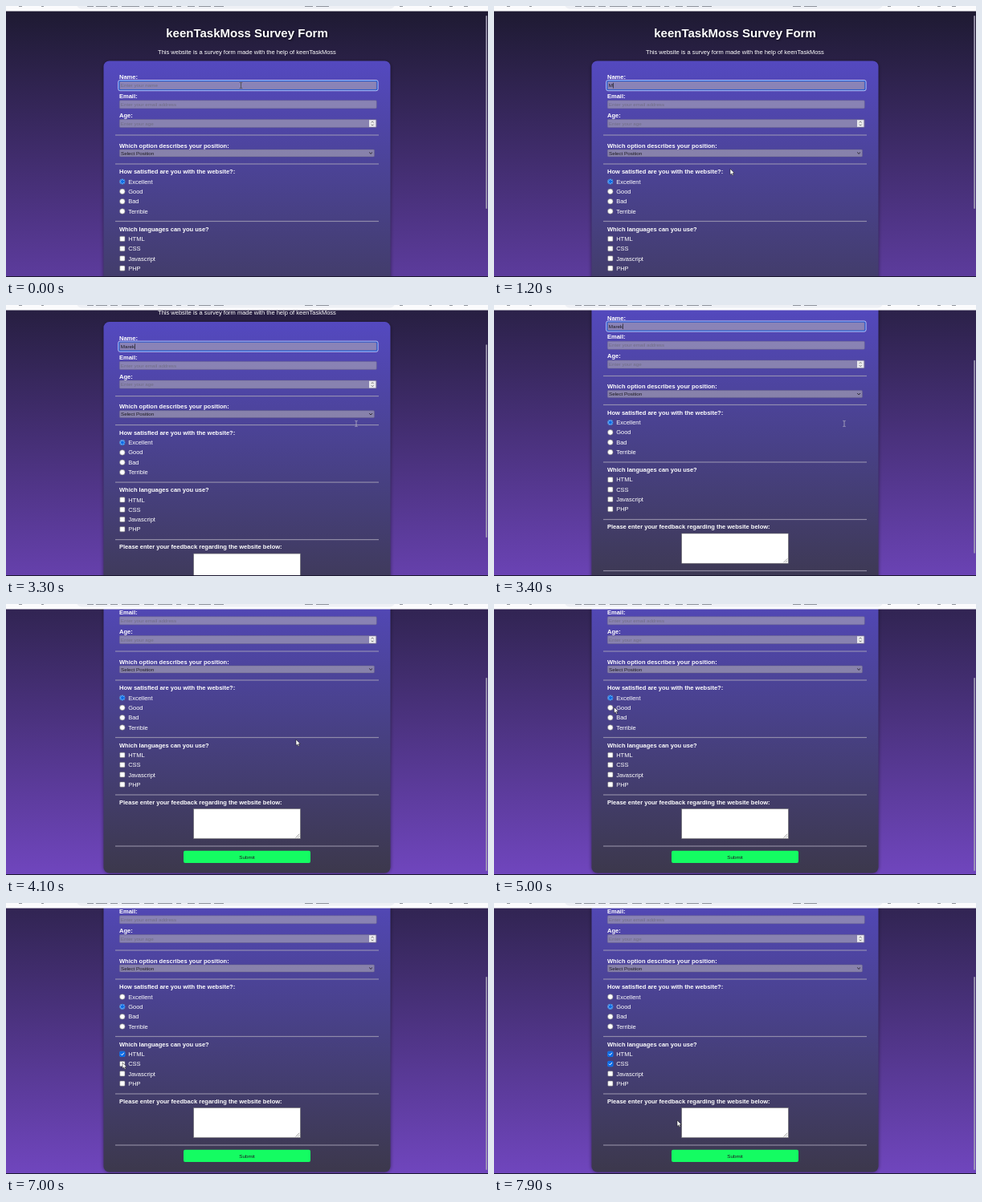
Write an HTML page that moves like this. It is 600x338 px and loops after 8 s.

```html
<!DOCTYPE html>
<html lang="en">
<head>
<meta charset="utf-8">
<title>Survey form</title>
<style>
  html, body { margin: 0; width: 100%; height: 100%; overflow: hidden; background: #1e1a32; }
  svg { display: block; width: 600px; height: 338px; }
  text { font: 7.5px "Liberation Sans", Arial, sans-serif; fill: #fff; }
  .b { font-weight: bold; }
  .title { font-size: 15px; font-weight: bold; text-anchor: middle; filter: drop-shadow(1.5px 1.5px 1px #0009); }
  .mid { text-anchor: middle; }
  .small { font-size: 6.24px; fill: #1c1a22; }
  .hint { fill: #716e86; }
  .field { fill: #b9b4b98c; stroke: #6a668299; stroke-width: .7; }
  .box { fill: #fff; stroke: #777; stroke-width: .6; }
  .on { fill: #0b6ae6; stroke: #0b6ae6; }
</style>
</head>
<body>
<svg viewBox="0 0 600 338">
  <defs>
    <linearGradient id="sky" x2="0" y2="1">
      <stop stop-color="#1e1a32"/><stop offset="1" stop-color="#7046be"/>
    </linearGradient>
    <linearGradient id="card" x2="0" y2="1">
      <stop stop-color="#5449c0"/><stop offset="1" stop-color="#3c384c"/>
    </linearGradient>
    <filter id="soft" x="-10%" y="-10%" width="120%" height="120%"><feGaussianBlur stdDeviation="2"/></filter>
  </defs>
  <g id="page"></g>
  <rect id="thumb" x="597.3" width="1.6" height="241" rx=".8" fill="#a7a3b8"/>
  <rect y="337" width="600" height="1" fill="#1b1730"/>
  <g id="chrome">
    <rect width="600" height="6.5" fill="#fbfbfd"/>
    <rect x="88" y="-10" width="396" height="13.5" rx="6" fill="#eef0f5"/>
    <path d="M16 .4h4M44 .4h3M101 .4h8m3 0h14m4 0h9m5 0h22m6 0h12m5 0h18m5 0h6m8 0h9m5 0h15m4 0h12M372 .4h10m4 0h16M490 .4h4M527 .4h3M552 .4h4M570 .4h5" stroke="#777b85" stroke-width=".9"/>
  </g>
  <path id="arrow" d="M0 0V7.4L1.7 5.9 2.9 8.5 4.1 8 3 5.4H5.3Z" fill="#fff" stroke="#111" stroke-width=".5"/>
  <path id="beam" d="M-1.6 -3.6Q0 -3.6 0 -2.8Q0 -3.6 1.6 -3.6M0 -2.8V2.8M-1.6 3.6Q0 3.6 0 2.8Q0 3.6 1.6 3.6" fill="none" stroke-width=".8"/>
</svg>
<script>
const $ = id => document.getElementById(id);
const text = (x, y, s, cls = "", id = "") => `<text x="${x}" y="${y}" class="${cls}" id="${id}">${s}</text>`;
const rect = (x, y, w, h, attrs) => `<rect x="${x}" y="${y}" width="${w}" height="${h}" ${attrs}/>`;
const field = (y, h, w = 320) => rect(141.3, y, w, h, 'rx="1.2" class="field"');
const brand = "keenTaskMoss", person = "Marek";

const radio = (label, i) => {
  const y = 219 + i * 12.35;
  return `<circle cx="144.8" cy="${y}" r="3.3" class="box"/>
    <g id="radio${i}"><circle cx="144.8" cy="${y}" r="3" fill="#fff" stroke="#0b6ae6" stroke-width="1"/>
    <circle cx="144.8" cy="${y}" r="1.8" class="on"/></g>` + text(152.2, y + 2.5, label);
};
const check = (label, i) => {
  const y = 290.3 + i * 12.25;
  return rect(141.7, y - 3.1, 6.3, 6.3, 'rx="1" class="box"') +
    `<g id="check${i}">${rect(141.7, y - 3.1, 6.3, 6.3, 'rx="1" class="on"')}
    <path d="M143 ${y}l1.4 1.5 2.4 -3" fill="none" stroke="#fff" stroke-width="1"/></g>` + text(152.2, y + 2.7, label);
};

$("page").innerHTML =
  rect(0, 6, 600, 435, 'fill="url(#sky)"') +
  text(300, 39, brand + " Survey Form", "title") +
  text(300, 59.5, `This website is a survey form made with the help of ${brand}`, "mid") +
  rect(121, 69, 358, 369, 'rx="8" fill="#0006" filter="url(#soft)"') +
  rect(121.5, 68.5, 357, 369, 'rx="7" fill="url(#card)"') +
  [161, 197, 268.5, 340, 404].map(y => rect(136, y - .6, 328, 1.2, 'fill="#a9a5b8" opacity=".75"')).join("") +
  text(141, 91.3, "Name:", "b") + field(94, 10.2) +
  rect(140.6, 93.4, 321.6, 11.4, 'rx="1.6" fill="none" stroke="#1d5fe0" stroke-width="1.2"') +
  rect(139.7, 92.5, 323.4, 13.2, 'rx="2.2" fill="none" stroke="#d5defa" stroke-width=".8"') +
  text(142.8, 101.3, "", "small", "name") + rect(0, 95.8, .6, 6.8, 'id="caret" fill="#111"') +
  text(141, 115, "Email:", "b") + field(117.8, 10) + text(142.8, 125, "Enter your email address", "small hint") +
  text(141, 139, "Age:", "b") + field(141.5, 10) + text(142.8, 148.7, "Enter your age", "small hint") +
  rect(452, 142.2, 8.3, 8.6, 'fill="#e9e9ec"') +
  '<path d="M454.8 145.4l1.4-1.4 1.4 1.4M454.8 147.7l1.4 1.4 1.4-1.4" fill="none" stroke="#555" stroke-width=".8"/>' +
  text(141, 176.8, "Which option describes your position:", "b") +
  field(179.1, 8.8, 317.2) + text(143, 185.8, "Select Position", "small") +
  '<path d="M452.2 182.5l1.9 1.9 1.9-1.9" fill="none" stroke="#1c1a22" stroke-width=".9"/>' +
  text(141, 209.3, "How satisfied are you with the website?:", "b") +
  ["Excellent", "Good", "Bad", "Terrible"].map(radio).join("") +
  text(141, 280.8, "Which languages can you use?", "b") +
  ["HTML", "CSS", "Javascript", "PHP"].map(check).join("") +
  text(141, 351.8, "Please enter your feedback regarding the website below:", "b") +
  rect(233.7, 357.5, 132.6, 37.2, 'fill="#fff" stroke="#777" stroke-width=".6"') +
  '<path d="M360.5 393.6l4.8-4.8M363 393.6l2.3-2.3" stroke="#666" stroke-width=".6"/>' +
  rect(221, 409.7, 158, 15.4, 'rx="2" fill="#14fc62"') +
  text(300, 420, "Submit", "small mid");

// [time, x, y] of the pointer
const path = [[100, 292.5, 99], [600, 294, 203], [2720, 294, 203], [3150, 436, 148], [3600, 436, 148],
  [4050, 361, 169], [4400, 361, 169], [5050, 146, 128], [5500, 146, 128], [5950, 198.5, 185],
  [6100, 198.5, 185], [6400, 145, 187], [6750, 145, 187], [6950, 145, 199], [7250, 145, 199], [7750, 228, 271]];
// [time, offset] of the page scroll
const scrolls = [[3150, 0], [3400, 72.5], [3700, 102]];
const keys = [1100, 1400, 1700, 1950, 2200];

function at(points, t, i) {
  const n = points.findIndex(p => p[0] > t);
  if (n === 0) return points[0][i];
  if (n < 0) return points[points.length - 1][i];
  const a = points[n - 1], b = points[n], u = (t - a[0]) / (b[0] - a[0]);
  return a[i] + (b[i] - a[i]) * u * u * (3 - 2 * u);
}
const show = (id, on) => $(id).style.display = on ? "" : "none";

function draw(now) {
  const t = now % 8000, y = at(scrolls, t, 1);
  $("page").setAttribute("transform", `translate(0 ${-y})`);
  $("thumb").setAttribute("y", 12 + y * .784);

  const typed = keys.filter(k => k <= t), name = $("name");
  name.textContent = typed.length ? person.slice(0, typed.length) : "Enter your name";
  name.classList.toggle("hint", !typed.length);
  const last = typed.length ? typed[typed.length - 1] : 500;
  show("caret", t >= last && (t - last) % 1000 < 500);
  $("caret").setAttribute("x", 143 + (typed.length ? name.getComputedTextLength() : 0));

  for (let i = 0; i < 4; i++) {
    show("radio" + i, i === (t < 5200 ? 0 : 1));
    show("check" + i, t >= [6500, 7050, 9e3, 9e3][i]);
  }

  const beam = t < 250 || (t > 3100 && t < 3650);
  show("beam", beam);
  show("arrow", !beam);
  $("beam").setAttribute("stroke", t < 300 ? "#444" : "#b5b2c4");
  $(beam ? "beam" : "arrow").setAttribute("transform", `translate(${at(path, t, 1)} ${at(path, t, 2)})`);
}

const start = performance.now();
(function loop() {
  draw(performance.now() - start);
  requestAnimationFrame(loop);
})();
</script>
</body>
</html>
```
